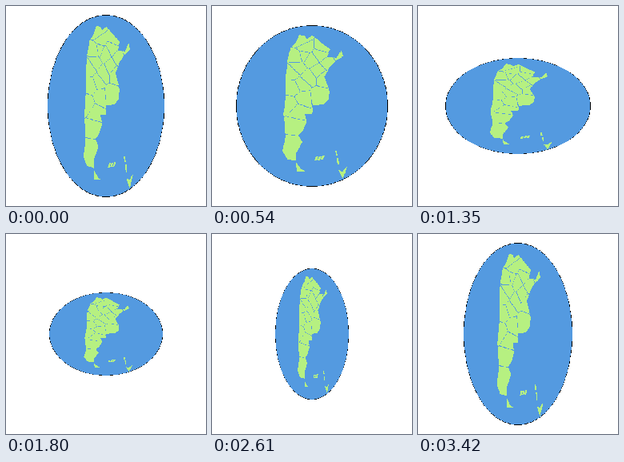
A matplotlib script for the animation above (3510 ms loop, 250x250 px).

```python
import numpy as np
import matplotlib.pyplot as plt
from matplotlib.animation import FuncAnimation
from matplotlib.path import Path

SIZE, FRAMES, STEP = 250, 39, 90
HALF_W, HALF_H = 160, 182          # half size of the disc bitmap
SEA, LAND = (84, 154, 224), (182, 240, 129)

# key points of the coast and frontier, clockwise from the north (lon, lat)
COAST = [
    (-66.5, -21.8), (-65, -22.1), (-64.4, -22.8), (-62.8, -22), (-57.7, -25.3),
    (-58.4, -27.2), (-55.6, -27.3), (-54.3, -25.6), (-53.7, -27), (-56, -28.3),
    (-57.4, -29.6), (-58.9, -32), (-57, -35.5), (-57, -37.4), (-58.6, -38.7),
    (-62.3, -39), (-62.4, -41), (-65, -41), (-64.2, -42.9), (-65.6, -45),
    (-67.5, -46.2), (-65.9, -47.8), (-68.4, -50.5), (-68.6, -52.4),
    (-72.4, -52), (-74, -50), (-72.3, -46.5), (-72.3, -41), (-71, -36),
    (-70.7, -31.5), (-70.1, -28), (-69, -25), (-67.4, -23.5)]
FUEGO = [(-68.6, -52.7), (-68.6, -54.9), (-64.8, -54.9), (-66.5, -54.4), (-68, -53.4)]

# middle of each province; borders run halfway between neighbours
SEATS = [
    (-65.8, -23.2), (-64.8, -24.8), (-60, -24.8), (-60.6, -26.4), (-54.5, -26.9),
    (-57.8, -28.7), (-59.2, -32), (-60.9, -30.7), (-63.3, -27.8), (-65.4, -26.9),
    (-67, -27.2), (-67.2, -29.7), (-68.9, -30.9), (-68.6, -34.6), (-66, -33.8),
    (-63.8, -32.1), (-65.4, -37.1), (-60.5, -36.7), (-70.1, -38.6), (-67.2, -40.4),
    (-68.5, -43.8), (-69.9, -48.4)]


def to_bitmap(points):
    """Drawing coordinates (disc of 190 x 202) to bitmap pixels."""
    x, y = np.array(points, float).T
    return np.column_stack([HALF_W * (1 + (x - 125) / 95),
                            HALF_H * (1 + (y - 125) / 101)])


def project(points):
    """Sinusoidal projection of lon/lat pairs to bitmap pixels."""
    lon, lat = np.array(points, float).T
    x = 115.8 + 4.78 * (lon + 65) * np.cos(np.radians(lat))
    y = 36 - 5.15 * (lat + 21.8)
    return to_bitmap(np.column_stack([x, y]))


def islet(x, y, w, h, lean):
    """Slanted four-sided island around a centre."""
    return to_bitmap([(x - w / 2 + lean, y - h / 2), (x + w / 2 + lean, y - h / 2),
                      (x + w / 2 - lean, y + h / 2), (x - w / 2 - lean, y + h / 2)])


def edge_of(mask):
    p = np.pad(mask, 1)
    core = p[:-2, 1:-1] & p[2:, 1:-1] & p[1:-1, :-2] & p[1:-1, 2:]
    return mask & ~core


def make_disc():
    w, h = 2 * HALF_W, 2 * HALF_H
    gx, gy = np.meshgrid(np.arange(w) + 0.5, np.arange(h) + 0.5)
    pixels = np.column_stack([gx.ravel(), gy.ravel()])
    img = np.full((h, w, 3), 255, np.uint8)

    inside = (gx / HALF_W - 1) ** 2 + (gy / HALF_H - 1) ** 2 <= 1
    img[inside] = SEA
    img[edge_of(inside)] = 0

    def fill(shape):
        img[Path(shape).contains_points(pixels).reshape(h, w)] = LAND

    fill(project(COAST))

    # province borders: where the nearest seat changes
    dist = [np.hypot(gx - x, gy - y) for x, y in project(SEATS)]
    near = np.argmin(dist, axis=0)
    border = np.zeros((h, w), bool)
    border[:, 1:] |= near[:, 1:] != near[:, :-1]
    border[1:] |= near[1:] != near[:-1]
    img[border & inside & ~edge_of(inside)] = SEA

    fill(project(FUEGO))
    for k in range(3):
        fill(islet(130.5 + 4 * k, 190.5 - k / 2, 3, 5, 1.2))
    for k in range(2):
        fill(islet(155.5 + 2 * k, 184 + 10 * k, 2, 6 + 2 * k, -0.5))
    fill(to_bitmap([(158, 205), (163, 207), (169.5, 200), (167, 207), (163.5, 216)]))
    return img


fig = plt.figure(figsize=(2.5, 2.5), dpi=100, facecolor="white")
ax = fig.add_axes([0, 0, 1, 1])
disc = ax.imshow(make_disc(), interpolation="nearest", aspect="auto")
ax.axis("off")


def draw(i):
    a = 2 * np.pi * i / FRAMES
    rx = round(72.8 + 27.2 * np.sin(a))
    ry = round(83.2 + 31 * np.cos(a))
    c = SIZE / 2
    disc.set_extent((c - rx, c + rx, c + ry, c - ry))
    ax.set_xlim(0, SIZE)
    ax.set_ylim(SIZE, 0)
    return [disc]


anim = FuncAnimation(fig, draw, frames=FRAMES, interval=STEP,
                     repeat=True, repeat_delay=0)
plt.show()
```
